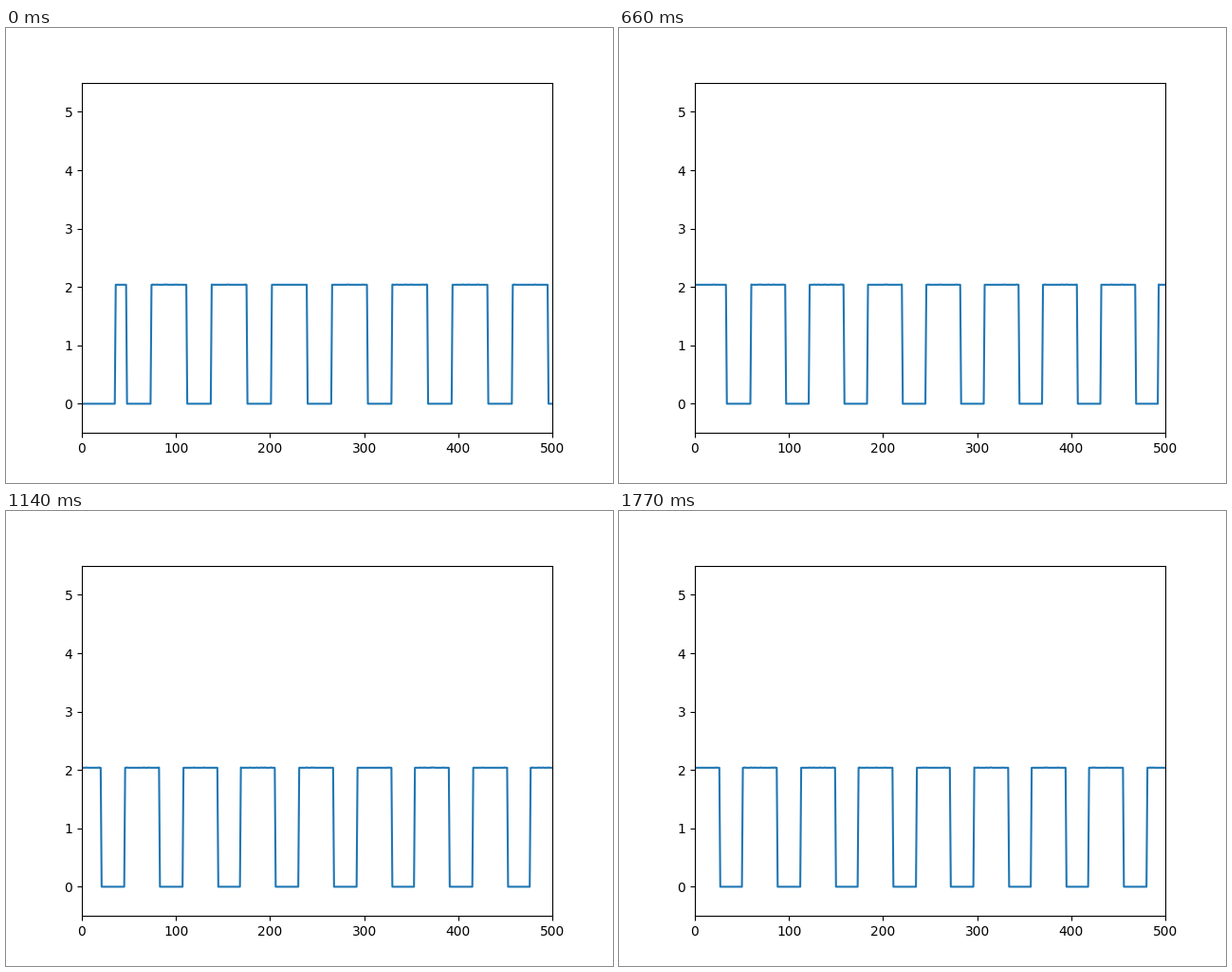
A matplotlib script that plays this animation: 640 by 480 pixels, repeating every 1800 ms.

```python
import numpy as np
import matplotlib.pyplot as plt
from matplotlib.animation import FuncAnimation

FRAMES, INTERVAL = 60, 30
WINDOW = 500
IDLE = 36             # empty samples before the capture begins
RATE = 20.275         # samples received per frame
BACKLOG = 15.55       # extra samples waiting at the first refresh
DUTY = 0.597
VOLTS = 5 / 1023      # one step of a 10-bit converter


def make_signal(size):
    # Steady 64-sample period at first, then a shorter one that slowly drifts.
    k = np.arange(30)
    late = np.maximum(k - 8, 0)
    rise = 10 + 64 * np.minimum(k, 8) + 62.1 * late - 0.026 * late**2
    fall = rise[:-1] + DUTY * np.diff(rise)
    edges = np.rint(np.column_stack([rise[:-1], fall]).ravel())

    t = np.arange(size)
    high = np.searchsorted(edges, t, side="right") % 2
    high[:IDLE] = 0
    flicker = np.random.default_rng(4).random(size) < 0.1
    return high * (417 + flicker) * VOLTS


def start_of(frame):
    return round(BACKLOG + RATE * frame) if frame else 0


signal = make_signal(start_of(FRAMES - 1) + WINDOW)

fig, ax = plt.subplots(figsize=(6.4, 4.8), dpi=100)
ax.set_xlim(0, WINDOW)
ax.set_ylim(-0.5, 5.5)
line, = ax.plot(np.arange(WINDOW), signal[:WINDOW])


def update(frame):
    start = start_of(frame)
    line.set_ydata(signal[start:start + WINDOW])
    return line,


anim = FuncAnimation(fig, update, frames=FRAMES, interval=INTERVAL,
                     repeat=True, repeat_delay=0)
plt.show()
```
